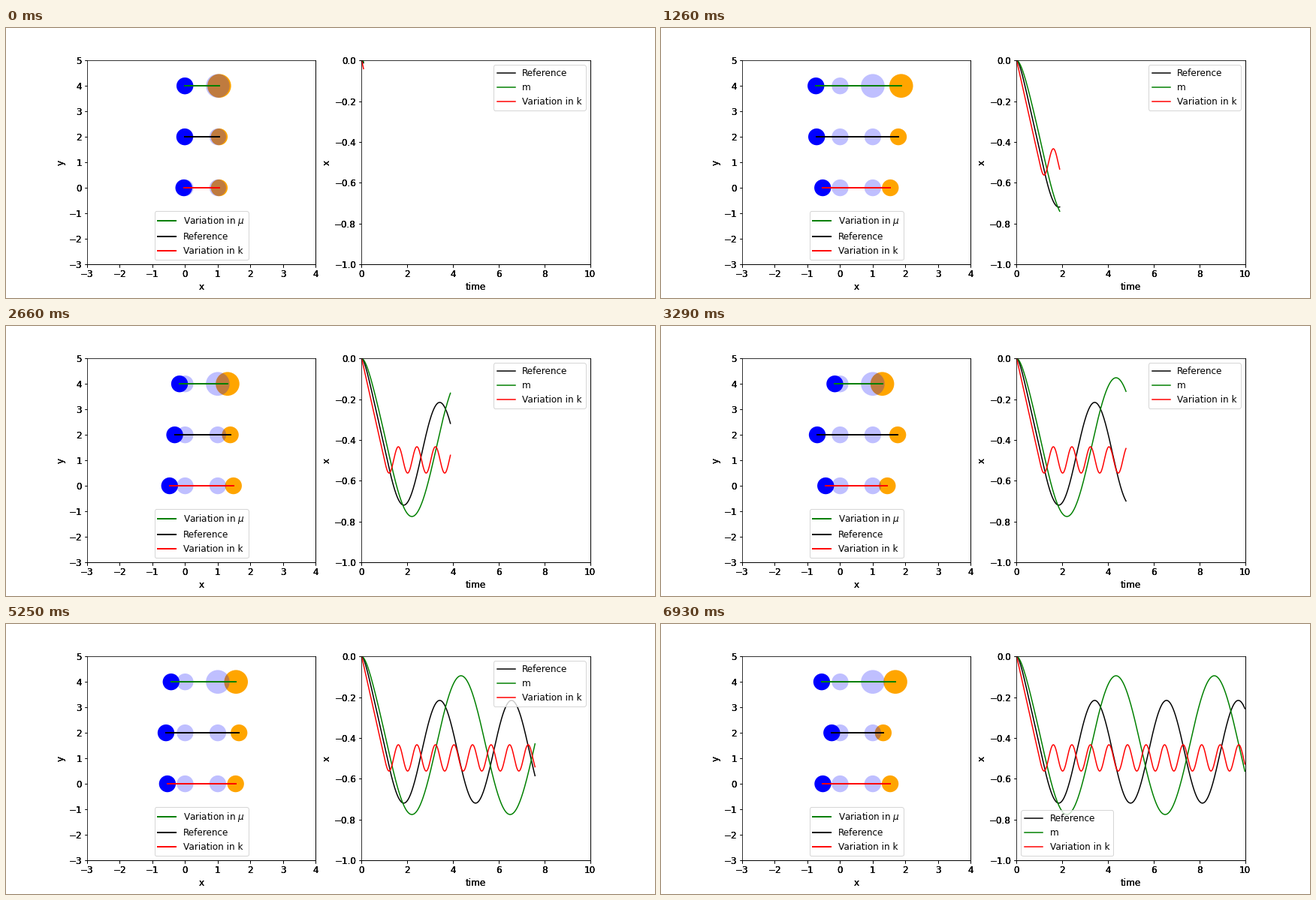
A matplotlib script for the animation above (7000 ms loop, 864 px wide and 360 px high).

```python
import numpy as np
import matplotlib.pyplot as plt
from matplotlib.animation import FuncAnimation

plt.rcParams.update({
    "font.family": "DejaVu Sans",
    "font.size": 12,
    "figure.subplot.bottom": 0.125,
})

FRAMES, INTERVAL = 100, 70
STEP, DT = 10, 0.01
LAYERS = 3          # stacked axes give the heavy tick labels
SPEED = 0.5
LEGEND_MOVE = 80    # the legend avoids the curves from here on
SMALL, LARGE = 500, 1000

t = np.arange(FRAMES * STEP) * DT


def motion(lag, omega):
    """Positions of both bodies: driven apart until t = 1, then free oscillation."""
    def driven(s):
        return -SPEED * (s - lag * (1 - np.exp(-s / lag)))

    start = driven(1.0)
    v = -SPEED * (1 - np.exp(-1 / lag))
    drift = SPEED + start
    centre = (drift - 1) / 2
    phase = omega * (t - 1)
    free = centre + (start - centre) * np.cos(phase) + v / omega * np.sin(phase)
    left = np.where(t < 1, driven(t), free)
    right = np.where(t < 1, 1 + SPEED * t, 1 + drift - free)
    return left, right


def stacked_axes(fig, pos, xlim, ylim, xlabel, ylabel):
    for _ in range(LAYERS):
        ax = fig.add_subplot(1, 2, pos, xlim=xlim, ylim=ylim,
                             xlabel=xlabel, ylabel=ylabel)
    return ax


class Pair:
    def __init__(self, ax, y, color, label, size, path):
        self.y = y
        self.left, self.right = path
        self.balls = ax.scatter([0, 1], [y, y], s=[SMALL, size],
                                c=["blue", "orange"], linewidths=0)
        ax.scatter([0, 1], [y, y], s=[SMALL, size], c="blue",
                   alpha=0.25, linewidths=0)
        self.rod, = ax.plot([], [], color=color, lw=2, label=label)

    def move(self, n):
        xs = [self.left[n], self.right[n]]
        self.balls.set_offsets([(x, self.y) for x in xs])
        self.rod.set_data(xs, [self.y, self.y])


fig = plt.figure(figsize=(12, 5), dpi=72)
scene = stacked_axes(fig, 1, (-3, 4), (-3, 5), "x", "y")
graph = stacked_axes(fig, 2, (0, 10), (-1, 0), "time", "x")

reference = motion(0.129, 2.0)
heavy = motion(0.265, 1.462)
stiff = motion(1 / 120, np.sqrt(60))

pairs = [
    Pair(scene, 4, "green", r"Variation in $\mu$", LARGE, heavy),
    Pair(scene, 2, "black", "Reference", SMALL, reference),
    Pair(scene, 0, "red", "Variation in k", SMALL, stiff),
]
scene.set(xlim=(-3, 4), ylim=(-3, 5))
scene.legend(loc="lower center")

curves = []
for path, color, label in [(reference, "black", "Reference"),
                           (heavy, "green", "m"),
                           (stiff, "red", "Variation in k")]:
    line, = graph.plot([], [], color=color, lw=1.5, label=label)
    curves.append((line, path[0]))
graph.set(xlim=(0, 10), ylim=(-1, 0))
legend = graph.legend(loc="upper right")


def update(i):
    n = (i + 1) * STEP
    for pair in pairs:
        pair.move(n - 1)
    for line, x in curves:
        line.set_data(t[:n], x[:n])
    legend.set_loc("upper right" if i < LEGEND_MOVE else "lower left")


def init():
    update(0)


anim = FuncAnimation(fig, update, frames=FRAMES, init_func=init,
                     interval=INTERVAL, repeat=True, repeat_delay=0)
plt.show()
```
